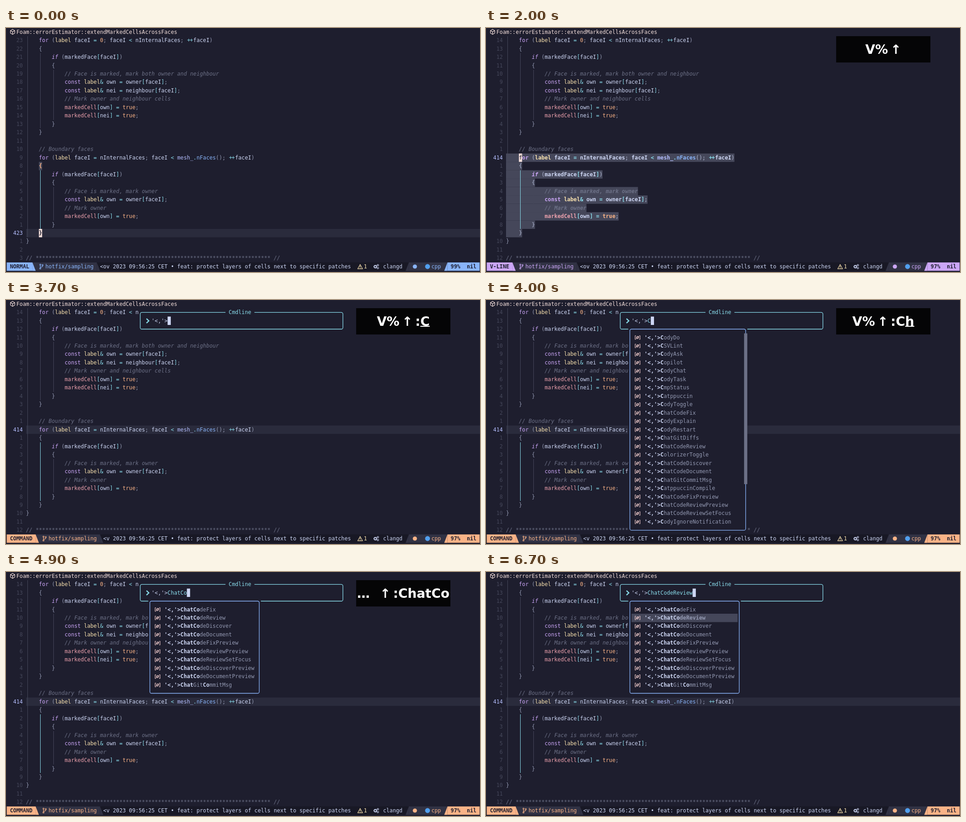
An HTML page with a canvas for the animation above (8 s loop, 1041 px wide and 538 px high).

```html
<!DOCTYPE html>
<html lang="en">
<head>
<meta charset="utf-8">
<title>Editor session</title>
<style>
  html, body { margin: 0; width: 100%; height: 100%; overflow: hidden; background: #1e1e2e; }
  canvas { display: block; }
</style>
</head>
<body>
<canvas id="stage" width="1041" height="538"></canvas>
<script>
const ctx = document.getElementById('stage').getContext('2d');
const LOOP = 8000, CELL = 7.065, LINE = 18.475, GUTTER = 6;
const colX = c => 1.6 + c * CELL;
const rowY = r => r * LINE - 0.4;

const C = {
  base: '#1e1e2e', mantle: '#181825', surface0: '#313244', surface1: '#45475a', cursorLine: '#2a2b3c',
  overlay: '#6c7086', punct: '#9399b2', text: '#cdd6f4', mauve: '#cba6f7', yellow: '#f9e2af',
  red: '#eba0ac', sky: '#89dceb', peach: '#fab387', lavender: '#b4befe', blue: '#89b4fa',
  rose: '#f5e0dc', flamingo: '#f2cdcd'
};

const CODE = `    for (label faceI = 0; faceI < nInternalFaces; ++faceI)
    {
        if (markedFace[faceI])
        {
            // Face is marked, mark both owner and neighbour
            const label& own = owner[faceI];
            const label& nei = neighbour[faceI];
            // Mark owner and neighbour cells
            markedCell[own] = true;
            markedCell[nei] = true;
        }
    }

    // Boundary faces
    for (label faceI = nInternalFaces; faceI < mesh_.nFaces(); ++faceI)
    {
        if (markedFace[faceI])
        {
            // Face is marked, mark owner
            const label& own = owner[faceI];
            // Mark owner
            markedCell[own] = true;
        }
    }
}

// ${'*'.repeat(73)} //`.split('\n');

const TOKEN = /(?<overlay>\/\/.*)|(?<mauve>\b(?:for|if|const)\b)|(?<yellow>\blabel\b)|(?<peach>\btrue\b|\b0\b)|(?<red>\bmarkedCell\b)|(?<lavender>\bmesh_)|(?<blue>\bnFaces\b)|(?<text>\w+)|(?<punct>[(){};]+)|(?<sky>[^\s\w(){};]+)/g;

const COMMANDS = ('CodyDo CSVLint CodyAsk Copilot CodyChat CodyTask CmpStatus Catppuccin CodyToggle ChatCodeFix ' +
  'CodyExplain CodyRestart ChatGitDiffs ChatCodeReview ColorizerToggle ChatCodeDiscover ChatCodeDocument ' +
  'ChatGitCommitMsg CatppuccinCompile ChatCodeFixPreview ChatCodeReviewPreview ChatCodeReviewSetFocus ' +
  'CodyIgnoreNotification ChatCodeDiscoverPreview ChatCodeDocumentPreview').split(' ');
const RANGE = "'<,'>";

const THIN = '\u2009';
const KEYS = [[500, 'V'], [1400, '%'], [1800, THIN + '↑'], [2900, THIN + ':'], [3700, 'C'], [4000, 'h'], [4100, 'a'],
  [4200, 't'], [4600, 'C'], [4700, 'o'], [5100, THIN + '↹'], [5500, THIN + '↹']];
const TYPED = [[3800, 'C'], [4100, 'h'], [4200, 'a'], [4300, 't'], [4700, 'C'], [4800, 'o']];

function rect(x0, y0, x1, y1, color) {
  ctx.fillStyle = color;
  ctx.fillRect(x0, y0, x1 - x0, y1 - y0);
}
const cells = (c0, c1, row, color, rows = 1) => rect(colX(c0), rowY(row), colX(c1), rowY(row + rows), color);

function stroke(path, color, width = 1.2) {
  ctx.strokeStyle = color;
  ctx.lineWidth = width;
  ctx.stroke(new Path2D(path));
}
function fill(path, color) {
  ctx.fillStyle = color;
  ctx.fill(new Path2D(path));
}
function disc(x, y, r, color) {
  ctx.fillStyle = color;
  ctx.beginPath();
  ctx.arc(x, y, r, 0, 7);
  ctx.fill();
}

// One glyph per cell; a pair of pluses is pulled together like a ligature.
function write(str, col, row, color, style = '') {
  ctx.font = `${style} 11.735px "DejaVu Sans Mono", monospace`;
  ctx.fillStyle = color;
  for (let i = 0; i < str.length; i++) {
    if (str[i] === ' ') continue;
    const pull = str[i] !== '+' ? 0 : str[i + 1] === '+' ? 0.6 : -0.6;
    ctx.fillText(str[i], colX(col + i) + pull, rowY(row) + 13);
  }
}

function stateAt(t) {
  const mode = t < 500 ? 'NORMAL' : t < 2900 ? 'V-LINE' : 'COMMAND';
  const typed = TYPED.filter(([at]) => t >= at).map(k => k[1]).join('');
  return {
    mode, typed,
    accent: { NORMAL: C.blue, 'V-LINE': C.mauve, COMMAND: C.peach }[mode],
    cursor: t < 1500 ? 24 : t < 1800 ? 16 : 15,
    selected: t < 5100 ? -1 : t < 5500 ? 0 : 1
  };
}

function drawGuides() {
  const guide = (col, r0, r1, color = C.surface1) => {
    const x = Math.floor(colX(GUTTER + col + 0.5));
    rect(x, rowY(r0), x + 1, rowY(r1), color);
  };
  guide(0, 1, 25);
  guide(4, 3, 12);
  guide(8, 5, 11);
  guide(8, 19, 23);
  guide(4, 17, 24, C.sky);
}

function drawCode({ mode, cursor }) {
  const visual = mode === 'V-LINE';
  if (!visual) rect(colX(GUTTER), rowY(cursor), 1041, rowY(cursor + 1), C.cursorLine);
  CODE.forEach((line, i) => {
    const row = i + 1;
    if (visual && row >= cursor && row <= 24) cells(GUTTER, GUTTER + line.length, row, C.surface1);
  });
  drawGuides();

  CODE.forEach((line, i) => {
    const row = i + 1, here = row === cursor;
    const label = String(here ? 399 + row : Math.abs(row - cursor));
    write(label, 5 - label.length, row, here ? C.lavender : C.surface1);
    const bold = visual && row >= cursor && row <= 24 ? 'bold' : '';
    for (const m of line.matchAll(TOKEN)) {
      const kind = Object.keys(m.groups).find(k => m.groups[k]);
      const italic = kind === 'overlay' || m[0] === 'if' ? 'italic' : '';
      write(m[0], GUTTER + m.index, row, C[kind], `${italic} ${bold}`);
    }
  });
  if (mode === 'COMMAND') return;

  const block = (row, bg, fg) => {
    cells(GUTTER + 4, GUTTER + 5, row, bg);
    write(CODE[row - 1][4], GUTTER + 4, row, fg, row === 15 ? '' : 'bold');
  };
  block(cursor, C.rose, C.base);
  if (cursor !== 15) block(40 - cursor, C.surface1, C.peach);
}

function drawWinbar() {
  stroke('M14.5 3L19.3 5.7V11.3L14.5 14L9.7 11.3V5.7ZM9.7 5.7L14.5 8.5L19.3 5.7M14.5 8.5V14', C.rose, 1.1);
  write('Foam::errorEstimator::extendMarkedCellsAcrossFaces', 3, 0, C.rose);
}

function drawStatus({ mode, accent, cursor }) {
  const row = 28, top = rowY(row), bottom = rowY(row + 1);
  const slant = (col, color) => fill(`M${colX(col)} ${top}L${colX(col + 1)} ${bottom}H${colX(col)}Z`, color);
  const rise = (col, color) => fill(`M${colX(col + 1)} ${top}V${bottom}H${colX(col)}Z`, color);
  const end = mode.length + 2;

  cells(0, 147, row, C.mantle);
  cells(end, end + 20, row, C.surface0);
  slant(end + 20, C.surface0);
  cells(0, end, row, accent);
  slant(end, accent);
  write(mode, 1, row, C.base, 'bold');

  const x = colX(end + 2) + 1.5;
  stroke(`M${x + 1.5} 523V529M${x + 1.5} 527.5Q${x + 6.5} 527.5 ${x + 6.5} 524.5`, accent);
  for (const [dx, y] of [[1.5, 521.8], [1.5, 530.2], [6.5, 523]]) {
    disc(x + dx, y, 1.9, accent);
    disc(x + dx, y, 0.8, C.surface0);
  }
  write('hotfix/sampling', end + 4, row, accent);
  const blame = mode === 'COMMAND' ? '<v' : '<ov';
  write(blame + ' 2023 09:56:25 CET • feat: protect layers of cells next to specific patches', end + 21, row, C.text);

  stroke('M777.8 521.5L783 530.8H772.6ZM777.8 524.5V527.6M777.8 528.6V529.7', C.yellow, 1.2);
  write('1', 111, row, C.yellow);
  for (const [gx, gy, r] of [[811, 526.2, 2.6], [816.7, 523, 1.4], [816.7, 529.3, 1.4]]) {
    stroke(`M${gx - r} ${gy}a${r} ${r} 0 1 0 ${2 * r} 0a${r} ${r} 0 1 0 ${-2 * r} 0`, C.text, r * 0.7);
    ctx.setLineDash([1, 1.2]);
    const o = r + 0.8;
    stroke(`M${gx - o} ${gy}a${o} ${o} 0 1 0 ${2 * o} 0a${o} ${o} 0 1 0 ${-2 * o} 0`, C.text, 1);
    ctx.setLineDash([]);
  }
  write('clangd', 117, row, C.text);

  rise(124, C.surface0);
  cells(125, 137, row, C.surface0);
  disc(898, 526, 4.6, accent);
  disc(925.8, 526, 5.4, '#519fee');
  write('cpp', 132, row, accent);
  rise(136, accent);
  cells(137, 147, row, accent);
  write(cursor === 24 ? '99%' : '97%', 138, row, C.base, 'bold');
  write('nil', 143, row, C.base, 'bold');
}

function frame(c0, c1, r0, r1, color) {
  cells(c0, c1 + 1, r0, C.base, r1 - r0 + 1);
  const x = colX(c0 + 0.5), y = rowY(r0 + 0.5);
  ctx.strokeStyle = color;
  ctx.lineWidth = 1.3;
  ctx.beginPath();
  ctx.roundRect(x, y, colX(c1 + 0.5) - x, rowY(r1 + 0.5) - y, 3.5);
  ctx.stroke();
}

function drawCmdline(command) {
  frame(41, 104, 1, 3, C.sky);
  cells(68, 77, 1, C.base);
  write('Cmdline', 69, 1, C.sky);
  stroke('M308.5 41.2L313.6 46L308.5 50.8', C.sky, 2.4);
  write(RANGE, 45, 2, C.text);
  write(command, 50, 2, C.sky);
  const end = 50 + command.length;
  cells(end, end + 1, 2, C.text);
}

// Indices of the letters of name that match the query, or null.
function match(name, query) {
  const start = name.indexOf(query);
  if (start >= 0) return [...query].map((_, i) => start + i);
  const hits = [];
  let from = 0;
  for (const ch of query) {
    const at = name.indexOf(ch, from);
    if (at < 0) return null;
    hits.push(at);
    from = at + 1;
  }
  return hits;
}

function candidates(query) {
  const found = COMMANDS.filter(name => match(name, query));
  return found.sort((a, b) => b.startsWith(query) - a.startsWith(query));
}

function drawMenu(list, query, selected) {
  const scrolls = list.length > 23;
  const shown = list.slice(0, 23), right = scrolls ? 80 : 78;
  frame(44, right, 3, 4 + shown.length, C.blue);
  if (scrolls) cells(80, 81, 4, C.overlay, 18);
  shown.forEach((name, i) => {
    const row = 4 + i, y = rowY(row) + 9.3, active = i === selected;
    if (active) cells(45, right, row, C.surface1);
    stroke(`M329.5 ${y - 4}H327.5V${y + 4}H329.5M336.3 ${y - 4}H338.3V${y + 4}H336.3`, C.flamingo, 1.1);
    stroke(`M330.3 ${y + 2}C329.5 ${y - 2} 333 ${y - 3.5} 335.4 ${y - 2}C336.5 ${y + 1} 333 ${y + 3.5} 330.3 ${y + 2}L335.4 ${y - 2}`, C.flamingo, 1.1);
    write(RANGE, 49, row, C.text, 'bold');
    const hits = match(name, query);
    [...name].forEach((ch, k) => {
      const hit = hits.includes(k);
      write(ch, 54 + k, row, hit ? C.text : C.punct, hit || active ? 'bold' : '');
    });
  });
}

function drawKeys(t) {
  if (t < 500 || t >= 6700) return;
  rect(769, 18, 976, 76, '#050506');
  ctx.font = 'bold 28px "DejaVu Sans", sans-serif';
  ctx.fillStyle = '#fff';
  const width = s => ctx.measureText(s).width;
  const pressed = KEYS.filter(([at]) => t >= at);
  const [lastAt, lastKey] = pressed[pressed.length - 1];
  const keys = pressed.map(k => k[1]);
  const baseline = 57;
  let right = 872.5 + width(keys.join('')) / 2;
  if (width(keys.join('')) > 200) {
    right = 974;
    while (width(keys.join('')) > 175) keys.shift();
    ctx.fillText('…', 771, baseline);
  }
  const label = keys.join('');
  ctx.fillText(label, right - width(label), baseline);
  const key = lastKey.trim();
  if (t < lastAt + 200 && key !== ':') rect(right - width(key), 57, right, 59, '#fff');
}

function draw(t) {
  const state = stateAt(t);
  rect(0, 0, 1041, 538, C.base);
  drawWinbar();
  drawCode(state);
  drawStatus(state);
  if (state.mode === 'COMMAND') {
    const list = candidates(state.typed);
    drawCmdline(state.selected < 0 ? state.typed : list[state.selected]);
    if (state.typed) drawMenu(list, state.typed, state.selected);
  }
  drawKeys(t);
}

function tick() {
  draw(performance.now() % LOOP);
  requestAnimationFrame(tick);
}
tick();
</script>
</body>
</html>
```
